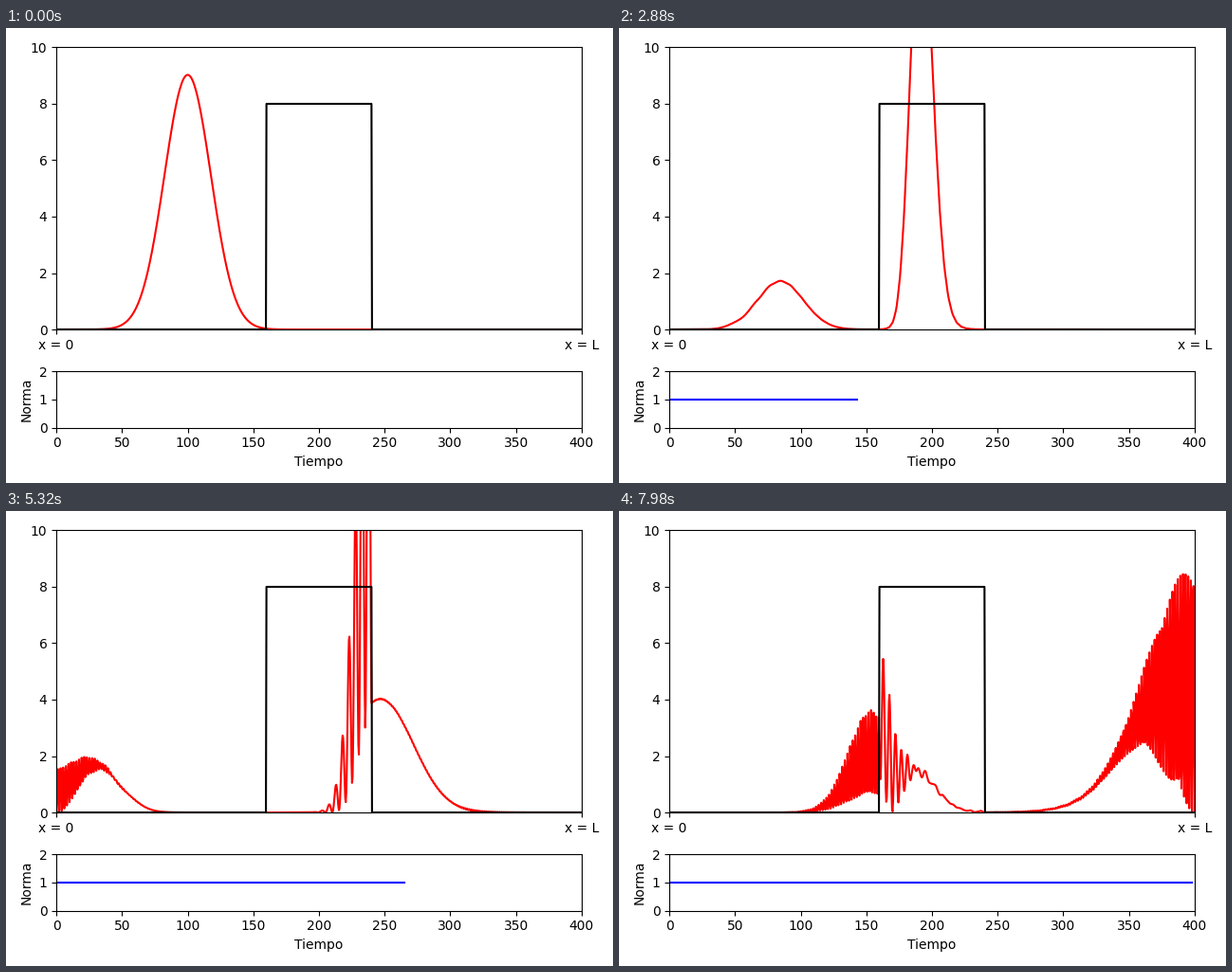
These frames come from a looping animation (640 px wide and 480 px high, 8 s). A matplotlib script:

```python
import numpy as np
import matplotlib.pyplot as plt
from matplotlib.animation import FuncAnimation

# Wave packet hitting a square barrier, on a lattice of N cells with hard walls
N = 1000
CYCLES = 100
HEIGHT = 0.8          # barrier height relative to the packet energy
FRAMES = 400
DT = 2.0              # lattice time per frame

k0 = 2 * np.pi * CYCLES / N
j = np.arange(N + 1)
barrier = (j >= 2 * N // 5) & (j <= 3 * N // 5)
V = HEIGHT * k0**2 * barrier


def evolve():
    """Probability density at every frame, one column per frame."""
    psi = np.exp(1j * k0 * j - 8 * (4 * j - N) ** 2 / N**2)[1:-1]
    psi /= np.sqrt(np.sum(np.abs(psi) ** 2) / N)
    hop = np.ones(N - 2)
    H = np.diag(2 + V[1:-1]) - np.diag(hop, 1) - np.diag(hop, -1)
    E, U = np.linalg.eigh(H)
    t = DT * np.arange(FRAMES)
    modes = (U.T @ psi.real + 1j * (U.T @ psi.imag))[:, None]
    modes = modes * np.exp(-1j * np.outer(E, t))
    density = np.zeros((N + 1, FRAMES))
    density[1:-1] = (U @ modes.real) ** 2 + (U @ modes.imag) ** 2
    return density


density = evolve()
norm = density.sum(axis=0) / N
time = np.arange(FRAMES)

fig, (top, low) = plt.subplots(
    2, 1, figsize=(6.4, 4.8), dpi=100, gridspec_kw={"height_ratios": [5, 1]})

wave, = top.plot(j, density[:, 0], color="red", lw=1.5)
top.plot(j, 10 * HEIGHT * barrier, color="black", lw=1.5)
top.set_xlim(0, N)
top.set_ylim(0, 10)
top.set_xticks([0, N], ["x = 0", "x = L"])

trace, = low.plot([], [], color="blue", lw=1.5)
low.set_xlim(0, FRAMES)
low.set_ylim(0, 2)
low.set_xticks(range(0, FRAMES + 1, 50))
low.set_yticks([0, 1, 2])
low.set_xlabel("Tiempo")
low.set_ylabel("Norma")

fig.tight_layout()


def update(i):
    wave.set_ydata(density[:, i])
    trace.set_data(time[:i], norm[:i])
    return wave, trace


ani = FuncAnimation(fig, update, frames=FRAMES, interval=20,
                    repeat=True, repeat_delay=0)
plt.show()
```
